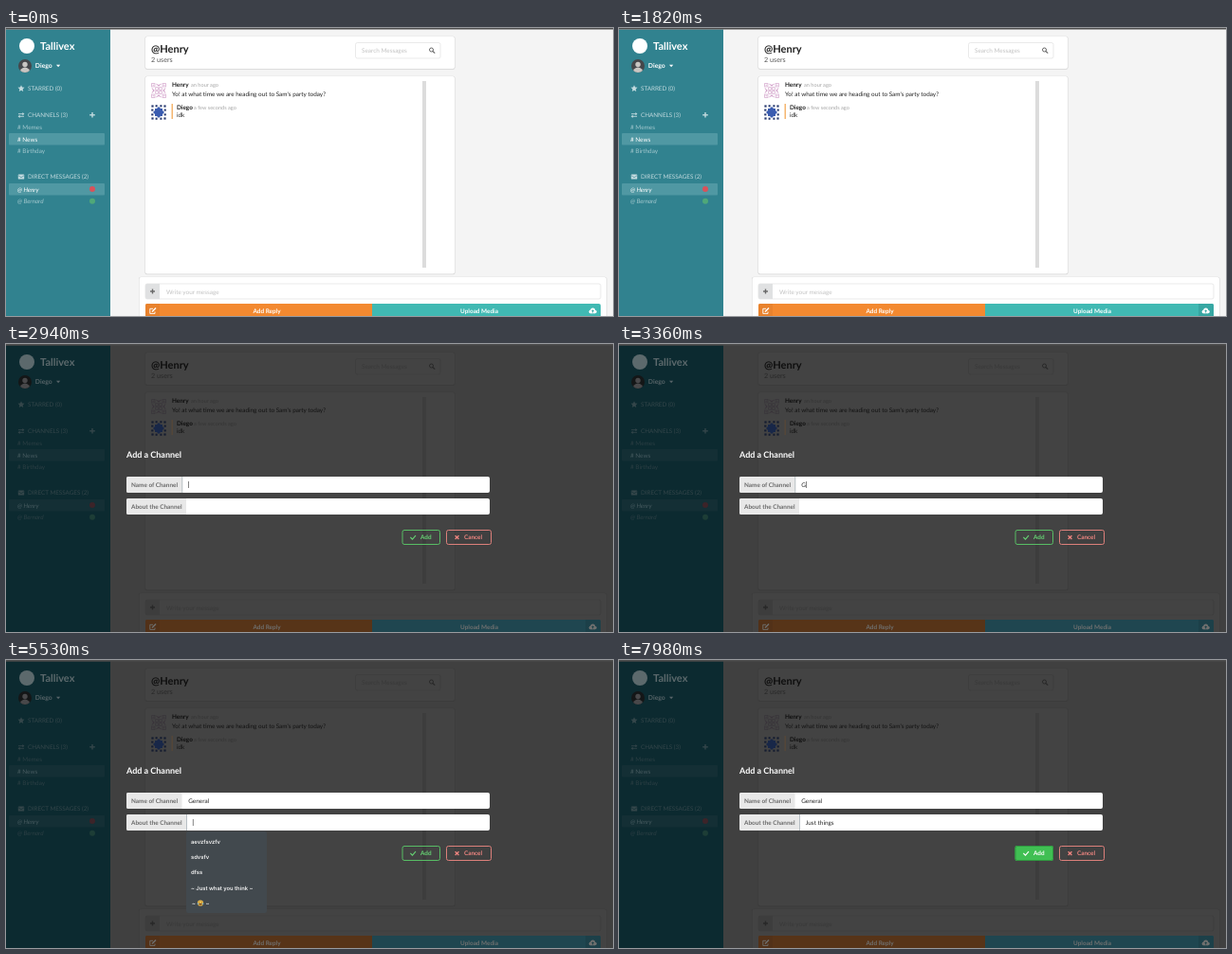
An HTML page with a canvas for the animation above (8 s loop, 640 by 304 pixels).

```html
<!DOCTYPE html>
<html lang="en">
<head>
<meta charset="utf-8">
<title>Add a channel</title>
<style>
html, body { margin: 0; width: 100%; height: 100%; overflow: hidden; background: #f4f4f4; }
canvas { display: block; width: 640px; height: 304px; }
</style>
</head>
<body>
<canvas id="stage"></canvas>
<script>
const LOOP = 8000;
const canvas = document.getElementById('stage');
const ctx = canvas.getContext('2d');
const ratio = window.devicePixelRatio || 1;
canvas.width = 640 * ratio;
canvas.height = 304 * ratio;
ctx.textRendering = 'geometricPrecision';

const LIGHT = {
  page: '#f4f4f4', side: '#31828f', row: '#5098a3', card: '#fff', edge: '#d6d6d6',
  brand: '#fff', name: '#fff', menu: '#c3dbdf', item: '#a3c8ce', active: '#fff',
  red: '#d9525a', green: '#4fa879', heading: '#1f1f1f', sub: '#555', body: '#222', meta: '#a5a5a5',
  line: '#e1e1e1', hint: '#c2c2c2', icon: '#666', track: '#dcdcdc', plus: '#e0e1e2',
  orange: '#f38930', orangeDark: '#e8822d', teal: '#40b9b3', tealDark: '#37a7a3', button: '#fff',
  pink: '#d3a3cb', blue: '#3a5cb0', navy: '#27396f', bar: '#f2a34c', photo: '#45464a', person: '#c9c5c2'
};
const DIM = {
  page: '#404040', side: '#0c2a30', row: '#142f35', card: '#434343', edge: '#3a3a3a',
  brand: '#5c696c', name: '#566367', menu: '#34464a', item: '#2c3f44', active: '#465a5f',
  red: '#3c2429', green: '#1d3d36', heading: '#0e0e0e', sub: '#282828', body: '#121212', meta: '#353535',
  line: '#3d3d3d', hint: '#393939', icon: '#282828', track: '#3d3d3d', plus: '#3d3d3d',
  orange: '#573418', orangeDark: '#523118', teal: '#1f4650', tealDark: '#1c4049', button: '#6f706f',
  pink: '#39343a', blue: '#182748', navy: '#141c30', bar: '#5a4838', photo: '#141617', person: '#48484a'
};

function text(str, x, y, color, { size = 6.4, font = 'Lato, sans-serif', weight = 400, style = 'normal', align = 'left' } = {}) {
  ctx.font = `${style} ${weight} ${size}px ${font}`;
  ctx.textAlign = align;
  ctx.fillStyle = color;
  ctx.fillText(str, x, y);
  return ctx.measureText(str).width;
}
const bold = (str, x, y, color, options) => text(str, x, y, color, { weight: 700, ...options });

function box(x, y, w, h, fill, radius = 0) {
  ctx.beginPath();
  ctx.roundRect(x, y, w, h, radius);
  ctx.fillStyle = fill;
  ctx.fill();
}
function frame(x, y, w, h, color, radius = 0, width = 0.7) {
  ctx.beginPath();
  ctx.roundRect(x, y, w, h, radius);
  ctx.strokeStyle = color;
  ctx.lineWidth = width;
  ctx.stroke();
}
function disc(x, y, r, color) {
  ctx.beginPath();
  ctx.arc(x, y, r, 0, Math.PI * 2);
  ctx.fillStyle = color;
  ctx.fill();
}
function poly(color, ...points) {
  ctx.beginPath();
  points.forEach(([x, y]) => ctx.lineTo(x, y));
  ctx.fillStyle = color;
  ctx.fill();
}
function path(color, width, ...points) {
  ctx.beginPath();
  points.forEach(([x, y]) => ctx.lineTo(x, y));
  ctx.strokeStyle = color;
  ctx.lineWidth = width;
  ctx.stroke();
}
function plusSign(x, y, r, color) {
  path(color, 1.4, [x - r, y], [x + r, y]);
  path(color, 1.4, [x, y - r], [x, y + r]);
}
function card(x, y, w, h, p) {
  box(x - 0.5, y - 0.2, w + 1, h + 1, p.edge, 2);
  box(x, y, w, h, p.card, 2);
}

function star(x, y, r, color) {
  const points = Array.from({ length: 10 }, (_, i) => {
    const a = i * Math.PI / 5 - Math.PI / 2, d = i % 2 ? r * 0.48 : r;
    return [x + d * Math.cos(a), y + d * Math.sin(a)];
  });
  poly(color, ...points);
}
function arrows(x, y, color) {
  path(color, 0.9, [x - 3, y - 1.3], [x + 2, y - 1.3]);
  path(color, 0.9, [x - 2, y + 1.3], [x + 3, y + 1.3]);
  poly(color, [x + 1.4, y - 3], [x + 3.4, y - 1.3], [x + 1.4, y + 0.3]);
  poly(color, [x - 1.4, y + 3], [x - 3.4, y + 1.3], [x - 1.4, y - 0.3]);
}
function envelope(x, y, color, gap) {
  box(x - 3.2, y - 2.4, 6.4, 4.9, color, 0.6);
  path(gap, 0.6, [x - 3.2, y - 1.4], [x, y + 0.8], [x + 3.2, y - 1.4]);
}
function cloud(x, y, color, gap) {
  disc(x - 2.2, y + 0.6, 1.9, color);
  disc(x, y - 0.7, 2.5, color);
  disc(x + 2.3, y + 0.7, 1.8, color);
  box(x - 2.2, y + 0.5, 4.5, 2, color);
  poly(gap, [x, y - 1.5], [x + 1.5, y + 0.3], [x - 1.5, y + 0.3]);
  box(x - 0.5, y, 1, 1.6, gap);
}

// Four-fold symmetric avatars on a 16px tile.
function fourfold(x, y, drawQuarter) {
  for (let i = 0; i < 4; i++) {
    ctx.save();
    ctx.translate(x + 8, y + 8);
    ctx.rotate(i * Math.PI / 2);
    drawQuarter();
    ctx.restore();
  }
}
function pinkTile(x, y, p) {
  fourfold(x, y, () => {
    frame(-7.5, -7.5, 3.4, 3.4, p.pink, 0, 0.7);
    box(-6.3, -6.3, 1.1, 1.1, p.pink);
    poly(p.pink, [-3.8, -7.8], [0, -4.2], [3.8, -7.8], [0, -6]);
    frame(-3.4, -3.4, 2.8, 2.8, p.pink, 0, 0.7);
  });
}
function blueTile(x, y, p) {
  box(x + 4, y + 4, 8, 8, p.blue);
  fourfold(x, y, () => {
    box(-7.6, -7.6, 2.2, 2.2, p.navy);
    box(-3.4, -7.8, 2, 2.2, p.navy);
    box(1.4, -7.8, 2, 2.2, p.navy);
    poly(p.blue, [-2, -4], [0, -6], [2, -4]);
  });
}

function sidebar(p) {
  box(0, 1.5, 110, 303, p.side);
  disc(22, 19, 8, p.brand);
  bold('Tallivex', 36, 23.3, p.brand, { size: 11 });

  ctx.save();
  ctx.beginPath();
  ctx.arc(20, 40, 7, 0, Math.PI * 2);
  ctx.clip();
  box(13, 33, 14, 14, p.photo);
  disc(20, 38.5, 2.7, p.person);
  disc(20, 47, 5.4, p.person);
  ctx.restore();
  bold('Diego', 30.8, 42.2, p.name, { size: 6.8 });
  poly(p.name, [53, 38.8], [57.2, 38.8], [55.1, 41.2]);

  star(16, 64, 3.7, p.menu);
  text('STARRED (0)', 23, 66.3, p.menu, { size: 6.3 });
  arrows(16, 92, p.menu);
  text('CHANNELS (3)', 23, 94.3, p.menu, { size: 6.3 });
  plusSign(91, 91.8, 2.8, p.menu);

  box(3, 111, 101, 12.5, p.row, 1);
  text('# Memes', 12, 106.5, p.item);
  text('# News', 12, 119.5, p.active);
  text('# Birthday', 12, 132, p.item);

  envelope(16, 157, p.menu, p.side);
  text('DIRECT MESSAGES (2)', 23, 159.4, p.menu, { size: 6.3 });
  box(3, 164, 101, 12.5, p.row, 1);
  text('@ Henry', 12, 172.5, p.active, { style: 'italic' });
  text('@ Bernard', 12, 185, p.item, { style: 'italic' });
  disc(91, 170, 3, p.red);
  disc(91, 182.7, 3, p.green);
}

function messages(p) {
  card(147, 9, 326, 34, p);
  bold('@Henry', 153, 25.5, p.heading, { size: 11 });
  text('2 users', 153, 35.5, p.sub, { size: 7.2 });
  frame(368.5, 15.5, 89.5, 16.5, p.line, 2);
  text('Search Messages', 375, 26, p.hint);
  ctx.beginPath();
  ctx.arc(448.5, 23, 2, 0, Math.PI * 2);
  ctx.strokeStyle = p.icon;
  ctx.lineWidth = 1;
  ctx.stroke();
  path(p.icon, 1.2, [450, 24.5], [452.2, 26.6]);

  card(147, 51, 326, 208.5, p);
  box(439, 56, 4, 197, p.track);
  pinkTile(153, 58, p);
  bold('Henry', 175, 62.4, p.heading);
  text('an hour ago', 195, 62.4, p.meta, { size: 5.6 });
  text("Yo! at what time we are heading out to Sam's party today?", 175, 72, p.body);
  blueTile(153, 81, p);
  box(174.6, 80, 1.2, 16, p.bar);
  bold('Diego', 180, 85.6, p.heading);
  text('a few seconds ago', 198, 85.6, p.meta, { size: 5.6 });
  text('idk', 180, 94.4, p.body);
}

function composer(p, shadedIcon) {
  card(140.5, 263, 492.5, 50, p);
  frame(147, 270, 480, 16, p.line, 2);
  box(147, 270, 15, 16, p.plus, [2, 0, 0, 2]);
  plusSign(154.5, 278, 2.5, p.icon);
  text('Write your message', 169, 280.5, p.hint);

  box(147, 291, 239, 14, p.orange, [2, 0, 0, 0]);
  box(147, 291, 15, 14, p.orangeDark, [2, 0, 0, 0]);
  box(386, 291, 241, 14, p.teal, [0, 2, 0, 0]);
  if (shadedIcon) box(611, 291, 16, 14, p.tealDark, [0, 2, 0, 0]);
  bold('Add Reply', 275, 300.7, p.button, { align: 'center' });
  bold('Upload Media', 499, 300.7, p.button, { align: 'center' });
  path(p.button, 0.9, [155, 296.3], [151.8, 296.3], [151.8, 301.4], [157, 301.4], [157, 299.5]);
  path(p.button, 1.4, [154, 299.4], [158, 295.6]);
  cloud(618.7, 298.8, p.button, p.tealDark);
}

function field(y, label, split, value, focused, caret) {
  box(127, y, 383, 17, '#fff', 2);
  box(127, y, split - 127, 17, '#e8e8e8', [2, 0, 0, 2]);
  bold(label, 132, y + 10.5, '#6a6a6a');
  if (focused) box(split, y, 0.7, 17, '#9aa5ac');
  const x = split + 6.7;
  const width = text(value, x, y + 10.9, '#242424');
  if (caret) box(x + width + 0.2, y + 5, 0.6, 7, '#333');
}

function suggestions() {
  box(190, 181, 85, 86, '#42494e', 2);
  const style = { font: 'Inter, sans-serif', size: 5.8, weight: 600 };
  ['aevzfsvzfv', 'sdvsfv', 'dfss', '~ Just what you think ~'].forEach((line, i) =>
    text(line, 195, 194 + i * 16.2, '#f2f2f2', style));
  text('~', 196, 258.7, '#f2f2f2', style);
  text('~', 210.5, 258.7, '#f2f2f2', style);
  disc(205, 256.5, 3.1, '#f2c04a');
  path('#5a3b1a', 0.6, [203.1, 255.9], [204.2, 255.3]);
  path('#5a3b1a', 0.6, [205.8, 255.3], [206.9, 255.9]);
  box(203.2, 257, 3.6, 1.5, '#6b3f20', [0, 0, 1.5, 1.5]);
  disc(202.4, 257.3, 0.8, '#6db6de');
  disc(207.6, 257.3, 0.8, '#6db6de');
}

function modalButtons(hover) {
  const green = hover ? '#fff' : '#66d273', red = '#f08681';
  if (hover) box(417.5, 196, 40.5, 16, '#40bf53', 2);
  frame(418, 196.5, 39.5, 15, hover ? '#2f9a40' : '#58bd65', 2, 1);
  path(green, 1.1, [426.4, 204], [428.5, 206.1], [432, 202.1]);
  bold('Add', 437, 206.4, green);
  frame(464.5, 196.5, 47, 15, '#dd807b', 2, 1);
  path(red, 1.3, [473.6, 202.2], [477.4, 206]);
  path(red, 1.3, [477.4, 202.2], [473.6, 206]);
  bold('Cancel', 483, 206.4, red);
}

const typed = (str, times, t) => str.slice(0, times.filter(at => at <= t).length);
const NAME_KEYS = [3360, 3570, 3710, 3780, 3920, 4060, 4200];
const ABOUT_KEYS = [5740, 6020, 6160, 6300, 6440, 6580, 6720, 6860, 7000, 7280, 7420];

function modal(t) {
  bold('Add a Channel', 127, 120.3, '#fff', { size: 9 });
  const nameFocus = t >= 2940 && t < 4620;
  const aboutFocus = t >= 4620;
  field(140, 'Name of Channel', 185.5, typed('General', NAME_KEYS, t), nameFocus, nameFocus);
  field(163, 'About the Channel', 190, typed('Just things', ABOUT_KEYS, t), aboutFocus, aboutFocus && t < 7560);
  modalButtons(t >= 7630);
  if (t >= 5180 && t < 5740) suggestions();
}

function draw(t) {
  const open = t >= 1890;
  const p = open ? DIM : LIGHT;
  ctx.setTransform(ratio, 0, 0, ratio, 0, 0);
  box(0, 0, 640, 304, p.page);
  sidebar(p);
  messages(p);
  composer(p, t >= 70);
  box(0, 0, 640, 1.6, '#4d4d4d');
  if (open) modal(t);
}

const start = performance.now();
function tick() {
  draw((performance.now() - start) % LOOP);
  requestAnimationFrame(tick);
}
tick();
</script>
</body>
</html>
```
